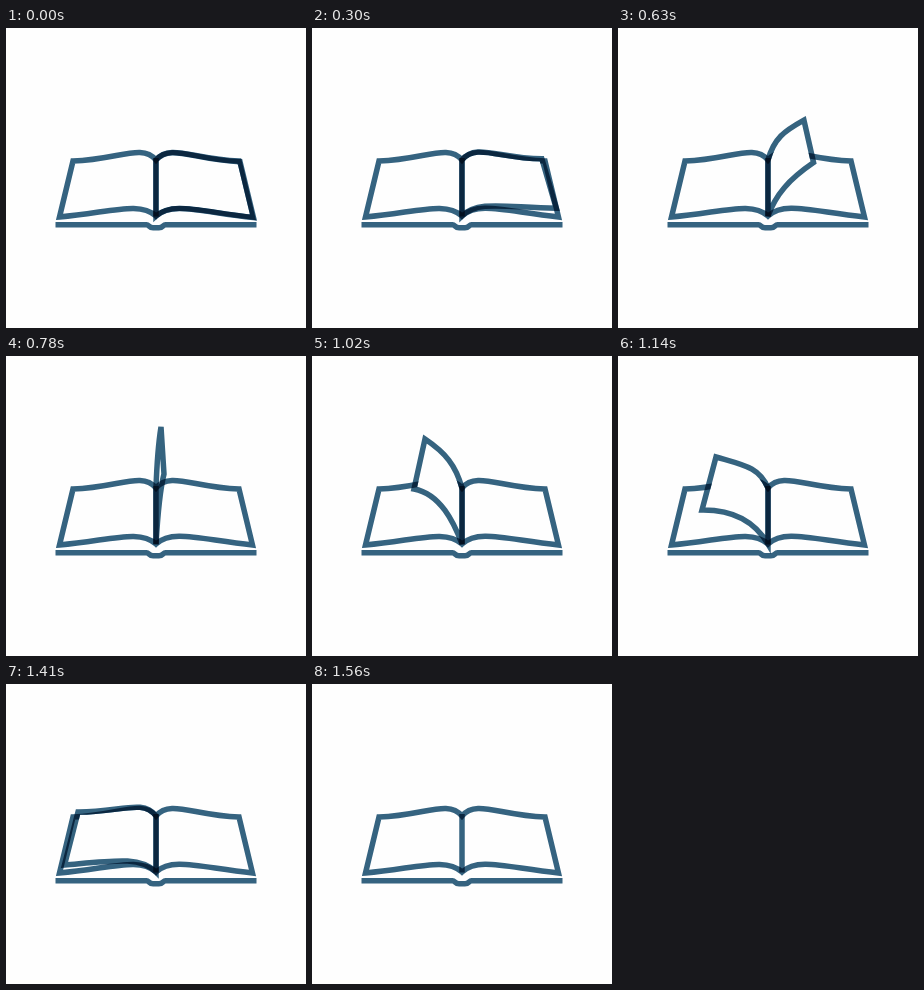
An HTML page that plays this animation: 300 px wide and 300 px high, repeating every 1.68 s.

```html
<!DOCTYPE html>
<html lang="en">
<head>
<meta charset="utf-8">
<title>Turning page</title>
<style>
  html, body { margin: 0; width: 100%; height: 100%; overflow: hidden; background: #fefefe; }
  svg { display: block; width: 100%; height: 100%; isolation: isolate; }
  .ink { fill: none; stroke: #356380; stroke-width: 5.5; }
  .blend { mix-blend-mode: multiply; }
</style>
</head>
<body>
<svg viewBox="0 0 300 300">
  <defs>
    <!-- hides the book beneath the inside of the turning page -->
    <mask id="under" maskUnits="userSpaceOnUse" x="0" y="0" width="300" height="300">
      <rect width="300" height="300" fill="#fff"/>
      <path id="cover" fill="#000" stroke="#fff" stroke-width="5.5"/>
    </mask>
  </defs>
  <rect width="300" height="300" fill="#fefefe"/>
  <g mask="url(#under)">
    <path id="book" class="ink"/>
    <path class="ink blend" d="M150 130V188.5"/>
  </g>
  <path class="ink" d="M49.5 196.7H140.5C143 196.7 143 199.7 147 199.7H153C157 199.7 157 196.7 159.5 196.7H250.5"/>
  <path id="page" class="ink blend"/>
</svg>
<script>
const LOOP = 1680, STEP = 30, END = 1560;
const MID = 150, TOP = 132, BOTTOM = 188;

// time, outer top corner, outer bottom corner of the turning page
const keys = [
  [150, 234, 133.7, 247.5, 189.6],
  [480, 213, 118, 227, 158],
  [780, 155, 71, 158, 118],
  [1020, 113, 83, 102, 133],
  [1140, 98, 101, 84, 154],
  [1410, 72, 128, 58.5, 181],
  [END, 67, 133, 53.5, 189]
];
const last = keys.length - 1;
const [book, page, cover] = ['book', 'page', 'cover'].map(id => document.getElementById(id));

// slope of value k at key i; the page rests at both ends
function slope(i, k) {
  if (i === 0 || i === last) return 0;
  const [a, b, c] = [keys[i - 1], keys[i], keys[i + 1]];
  const h = b[0] - a[0], g = c[0] - b[0];
  return (g * (b[k] - a[k]) / h + h * (c[k] - b[k]) / g) / (h + g);
}

function cornersAt(t) {
  t = Math.max(t, keys[0][0]);
  let i = 0;
  while (i < last - 1 && t >= keys[i + 1][0]) i++;
  const a = keys[i], b = keys[i + 1];
  const h = b[0] - a[0], u = (t - a[0]) / h, v = 1 - u;
  return [1, 2, 3, 4].map(k =>
    v * v * (1 + 2 * u) * a[k] + u * u * (3 - 2 * u) * b[k] +
    h * u * v * (v * slope(i, k) - u * slope(i + 1, k))
  );
}

// paper edge from the spine to a corner: a hump at the fold, then a flat run out
function edge(y0, x, y, hump, dip, bend) {
  const dx = x - MID, dy = y - y0;
  return [
    [MID + 0.17 * dx, y0 + 0.12 * dy - hump],
    [MID + 0.45 * dx, y0 + 0.7 * dy - dip - bend * dx * dy],
    [x, y]
  ];
}
const topEdge = (x, y) => edge(TOP, x, y, 17, 1, 0);
const bottomEdge = (x, y) => edge(BOTTOM, x, y, 15, 5, 0.0025);

const out = pts => 'C' + pts.join(' ');
const back = ([a, b, c], y0) => `L${c}C${b} ${a} ${MID} ${y0}`;

function leaf([tx, ty, bx, by]) {
  return `M${MID} ${TOP}` + out(topEdge(tx, ty)) + back(bottomEdge(bx, by), BOTTOM);
}

function draw(ms) {
  const t = Math.floor((ms % LOOP) / STEP) * STEP;
  const d = t < END ? leaf(cornersAt(t)) + 'Z' : '';
  page.setAttribute('d', d);
  cover.setAttribute('d', d);
}

const rest = keys[last].slice(1);
const [tx, ty, bx, by] = rest.map((n, i) => i % 2 ? n : 2 * MID - n);
book.setAttribute('d',
  leaf(rest) + out(bottomEdge(bx, by)) + back(topEdge(tx, ty), TOP) + 'Z');

let start;
function tick(now) {
  start ??= now;
  draw(now - start);
  requestAnimationFrame(tick);
}
draw(0);
requestAnimationFrame(tick);
</script>
</body>
</html>
```
